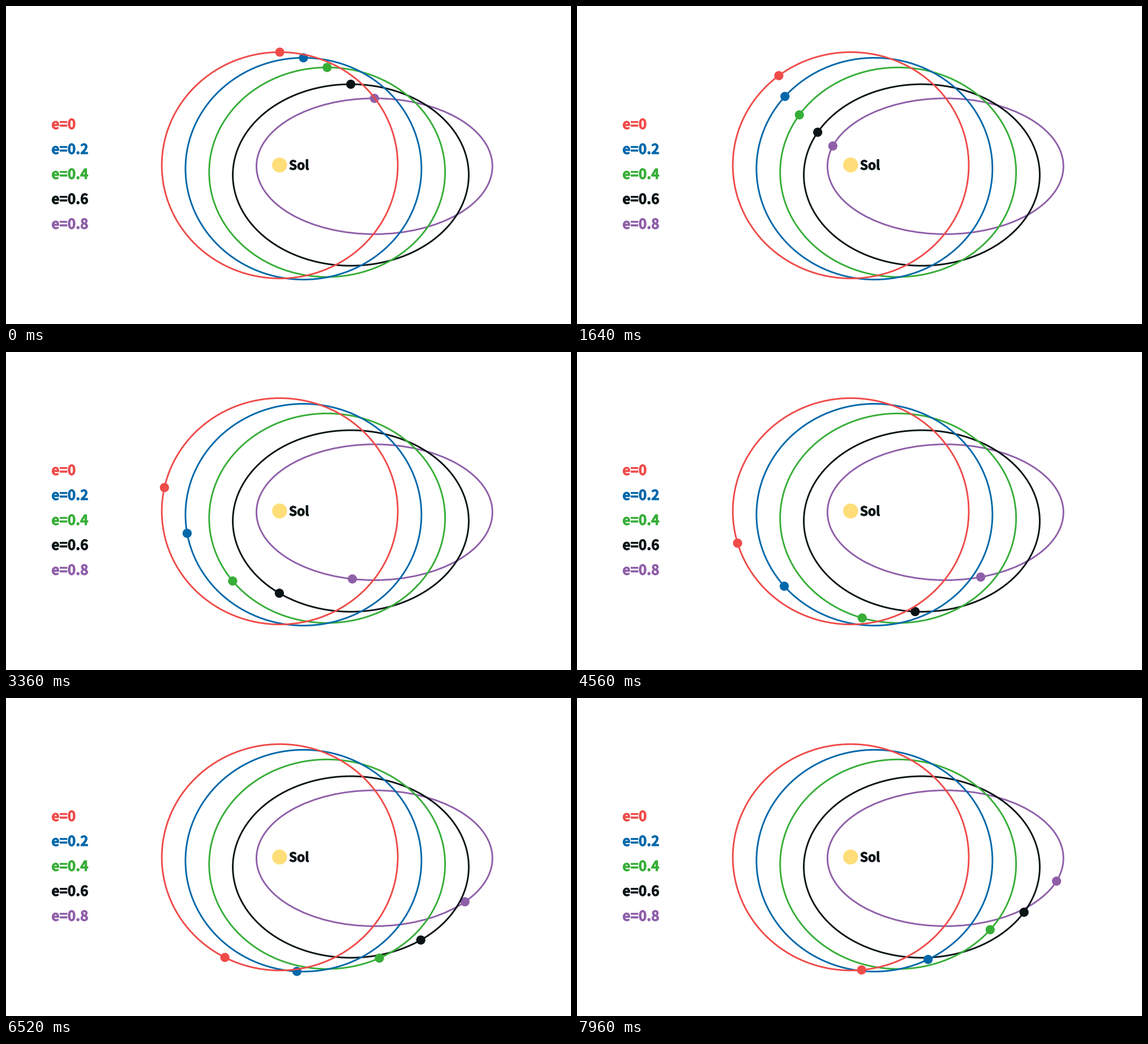
Recreate the animation shown at these times as a matplotlib script. Size 998 by 561 pixels, loop 8000 ms.

```python
import numpy as np
import matplotlib.pyplot as plt
import matplotlib.patheffects as pe
from matplotlib.animation import FuncAnimation
from matplotlib.patches import Circle, Ellipse

W, H, DPI = 998, 561, 100
PT = 72 / DPI
STEP, COUNT = 40, 200
FONT = "Noto Sans CJK JP"
INK = "#0a1416"
RX, LEFT, SPACING = 208.4, 483.6, 41.8

# colour, centre y, vertical radius, degrees per second, drift harmonics
ORBITS = [
    ("#ef4b49", 281.0, 199.6, 23.27, (0, -0.6)),
    ("#0068aa", 287.0, 195.6, 23.28, (7.1, 2.7, 0.5, -0.3)),
    ("#37ae38", 293.2, 184.8, 24.36, (8.0, 1.4, 0.6, -0.4)),
    (INK, 298.1, 160.1, 23.69, (1.8, 2.3, 1.4, 0.5)),
    ("#8f5fa9", 282.7, 119.8, 23.75, (-0.2, 0.3, 1.0, 0.8)),
]


def kepler(mean, e):
    """Eccentric anomaly for a mean anomaly, by bisection."""
    lo, hi = mean - 1.0, mean + 1.0
    for _ in range(40):
        mid = (lo + hi) / 2
        low = mid - e * np.sin(mid) < mean
        lo, hi = np.where(low, mid, lo), np.where(low, hi, mid)
    return (lo + hi) / 2


def track(e, cx, cy, ry, rate, drift):
    """Kepler motion from the top of the ellipse, plus a small drift."""
    s = np.arange(COUNT) / COUNT
    swept = rate * s * COUNT * STEP / 1000
    for n, amp in enumerate(drift, 1):
        swept += amp * np.sin(n * np.pi * s)
    E = kepler(np.radians(swept) - np.pi / 2 + e, e)
    return np.column_stack([cx - RX * np.cos(E), cy + ry * np.sin(E)])


def label(x, y, text, size, color):
    ax.text(x, y, text, size=size * PT, color=color, family=FONT, weight="black",
            va="baseline", ha="left",
            path_effects=[pe.withStroke(linewidth=0.9 * PT, foreground=color)])


fig = plt.figure(figsize=(W / DPI, H / DPI), dpi=DPI, facecolor="white")
ax = fig.add_axes([0, 0, 1, 1])
ax.set_xlim(0, W)
ax.set_ylim(H, 0)
ax.axis("off")

ax.add_patch(Circle((483.3, 280.5), 13.2, fc="#ffdd78", lw=0))
label(499.9, 288.8, "Sol", 22.6, INK)

dots, tracks = [], []
for k, (color, cy, ry, rate, drift) in enumerate(ORBITS):
    e, cx, z = k / 5, LEFT + SPACING * k, 20 - 2 * k
    label(80.2, 217 + 44 * k, f"e={e:g}", 24.4, color)
    ax.add_patch(Ellipse((cx, cy), 2 * RX, 2 * ry, fill=False,
                         ec=color, lw=2.9 * PT, zorder=z))
    dots.append(ax.add_patch(Circle((cx, cy), 8.1, fc=color, lw=0, zorder=z + 1)))
    tracks.append(track(e, cx, cy, ry, rate, drift))


def draw(i):
    for dot, path in zip(dots, tracks):
        dot.center = path[i]
    return dots


anim = FuncAnimation(fig, draw, frames=COUNT, interval=STEP,
                     init_func=lambda: draw(0), repeat=True, repeat_delay=0)
plt.show()
```
